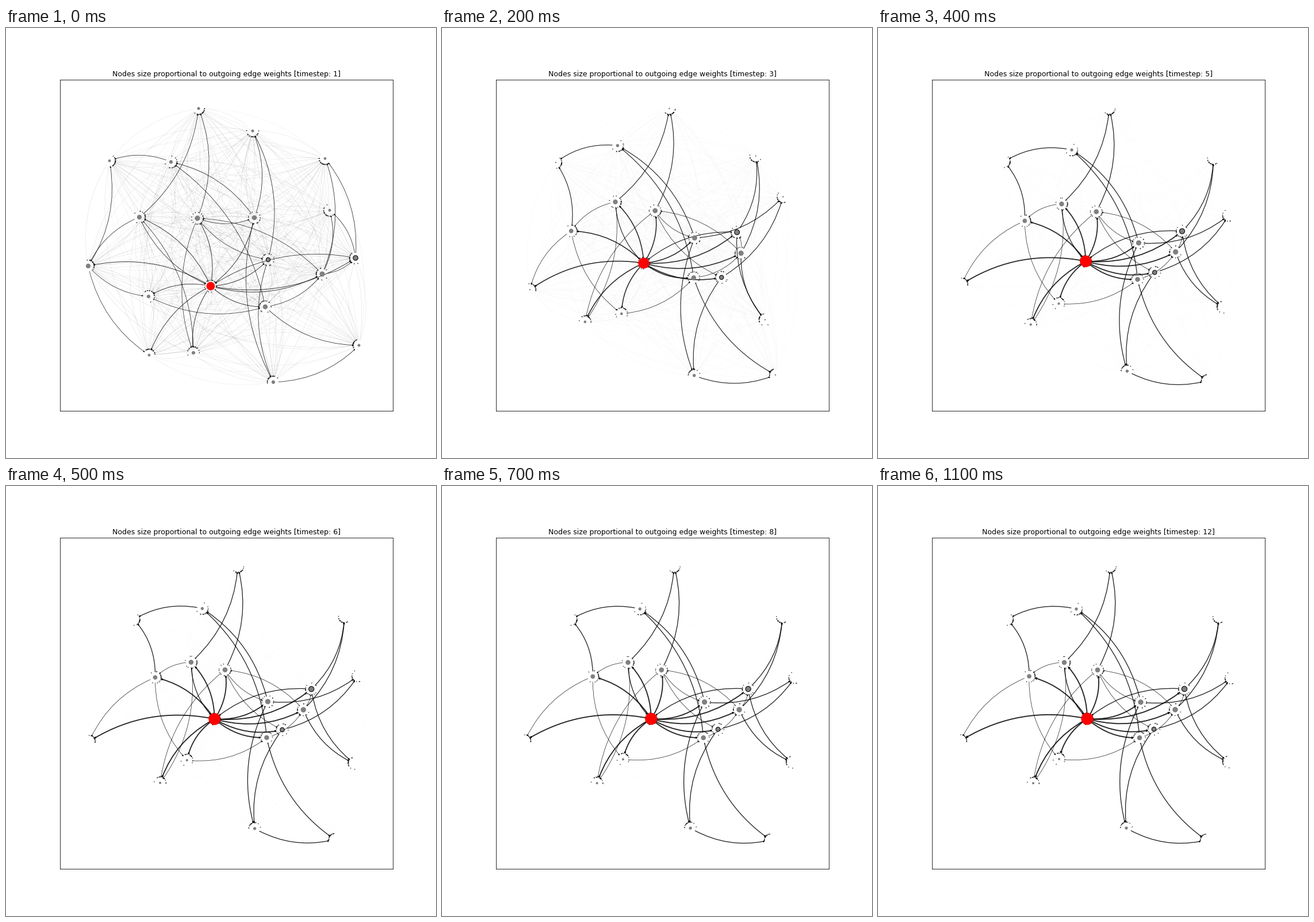
These frames come from a looping animation (748 px wide and 748 px high, 1200 ms). A matplotlib script:

```python
from itertools import permutations

import matplotlib.pyplot as plt
import numpy as np
from matplotlib.animation import FuncAnimation
from matplotlib.collections import PathCollection, PolyCollection
from matplotlib.path import Path

SIDE, DPI, STEPS = 748, 74.8, 12
PT = DPI / 72
BEND, MARGIN, HEAD = 0.2, 8.66 * PT, 1.9 * PT
SETTLE, GROW, FADE = 0.45, 0.6, 0.5

# The two strong feeders of every node
FEEDERS = dict(A="GH", B="IJ", C="DL", D="IP", E="KN", F="KN", G="MS",
               H="MN", I="MH", J="MH", K="MN", L="MG", M="GK", N="MP",
               O="ML", P="MO", Q="PT", R="ML", S="MH", T="IJ")
NAMES = list(FEEDERS)
HUB, RINGED = "M", "JK"

# Key poses: first step, second step, rest
FIRST = np.array([
    (335, 140), (429, 179), (180, 231), (287, 233), (555, 227),
    (563, 317), (232, 329), (333, 331), (432, 330), (456, 403),
    (608, 400), (143, 414), (356, 449), (550, 428), (248, 467),
    (451, 485), (614, 552), (249, 569), (326, 565), (465, 616)])
SECOND = np.array([
    (385, 140), (568, 244), (165, 236), (257, 193), (488, 216),
    (503, 541), (274, 297), (357, 315), (418, 352), (494, 447),
    (489, 358), (178, 380), (335, 414), (524, 395), (309, 524),
    (417, 430), (591, 588), (164, 470), (223, 504), (447, 616)])
REST = np.array([
    (404, 140), (614, 334), (225, 232), (345, 214), (593, 228),
    (610, 480), (324, 307), (382, 320), (457, 376), (480, 423),
    (533, 353), (263, 331), (364, 405), (517, 389), (315, 475),
    (455, 438), (571, 616), (144, 443), (270, 517), (432, 595)])

pairs = list(permutations(NAMES, 2))
src, dst = np.array([[NAMES.index(n) for n in pair] for pair in pairs]).T
strong = np.array([a in FEEDERS[b] for a, b in pairs])
from_hub = strong & np.array([a == HUB for a, _ in pairs])
shared = strong & np.array([HUB not in FEEDERS[b] for _, b in pairs])
noise = np.random.default_rng(4).uniform(0.5, 1.5, len(pairs))


def layout(step):
    if step == 1:
        return FIRST
    return REST + (SECOND - REST) * SETTLE ** (step - 2)


def weights(step):
    """The hub's edges win, rival feeders share, all others fade out."""
    left = GROW ** (step - 1)
    w = 0.055 * noise * FADE ** (step - 1)
    w[strong] = 0.7
    w[shared] = 1.3 - 0.55 * left
    w[from_hub] = 1.85 - left
    return w


def unit(v):
    return v / np.linalg.norm(v, axis=1, keepdims=True)


def turn(v):
    return np.column_stack([-v[:, 1], v[:, 0]])


def arcs(pos, width):
    """Bent edges trimmed near both nodes, and their arrowheads."""
    p, q = pos[src], pos[dst]
    c = (p + q) / 2 + BEND * turn(q - p)

    t = np.zeros((len(p), 1))
    for _ in range(8):
        v = 2 * (1 - t) * (c - p) + t * (q - p)
        t = MARGIN / np.linalg.norm(v, axis=1, keepdims=True)

    def blossom(a, b):
        return ((1 - a) * (1 - b) * p + (a * (1 - b) + b * (1 - a)) * c
                + a * b * q)

    start, mid, end = blossom(t, t), blossom(t, 1 - t), blossom(1 - t, 1 - t)
    along = unit(end - mid)
    # Pull back so that the mitred point lands on the end
    tip = end - along * width[:, None] * PT * np.sqrt(5) / 2
    base = tip - HEAD * along
    wing = turn(along) * HEAD / 2
    return (np.stack([start, mid, tip], axis=1),
            np.stack([tip, base + wing, base - wing], axis=1))


fig, ax = plt.subplots(figsize=(SIDE / DPI, SIDE / DPI), dpi=DPI,
                       facecolor="white")
ax.set(xlim=(0.125 * SIDE, 0.9 * SIDE), ylim=(0.89 * SIDE, 0.12 * SIDE),
       xticks=[], yticks=[])
title = ax.set_title("", fontsize=12, family="DejaVu Sans")

ink = dict(edgecolors="black", alpha=0.85, zorder=1)
lines = PathCollection([], facecolors="none", **ink)
heads = PolyCollection([], facecolors="black", joinstyle="miter", **ink)
for group in (lines, heads):
    ax.add_collection(group, autolim=False)

fills = ["red" if n == HUB else "gray" for n in NAMES]
rims = ["black" if n in RINGED else f for n, f in zip(NAMES, fills)]
nodes = ax.scatter(*FIRST.T, c=fills, edgecolors=rims, zorder=2,
                   linewidths=[float(n in RINGED) for n in NAMES])
CODES = [Path.MOVETO, Path.CURVE3, Path.CURVE3]


def draw(i):
    step = i + 1
    pos, width = layout(step), weights(step)
    curves, wedges = arcs(pos, width)
    lines.set_paths([Path(c, CODES) for c in curves])
    heads.set_verts(wedges)
    for group in (lines, heads):
        group.set_linewidth(width)
    size = 20.5 * np.bincount(src, weights=width)
    nodes.set_offsets(pos)
    nodes.set_sizes(np.where(size < 4, 0, size))
    title.set_text("Nodes size proportional to outgoing edge weights "
                   f"[timestep: {step}]")
    return lines, heads, nodes, title


anim = FuncAnimation(fig, draw, frames=STEPS, interval=100, repeat=True,
                     repeat_delay=0, blit=False)
plt.show()
```
